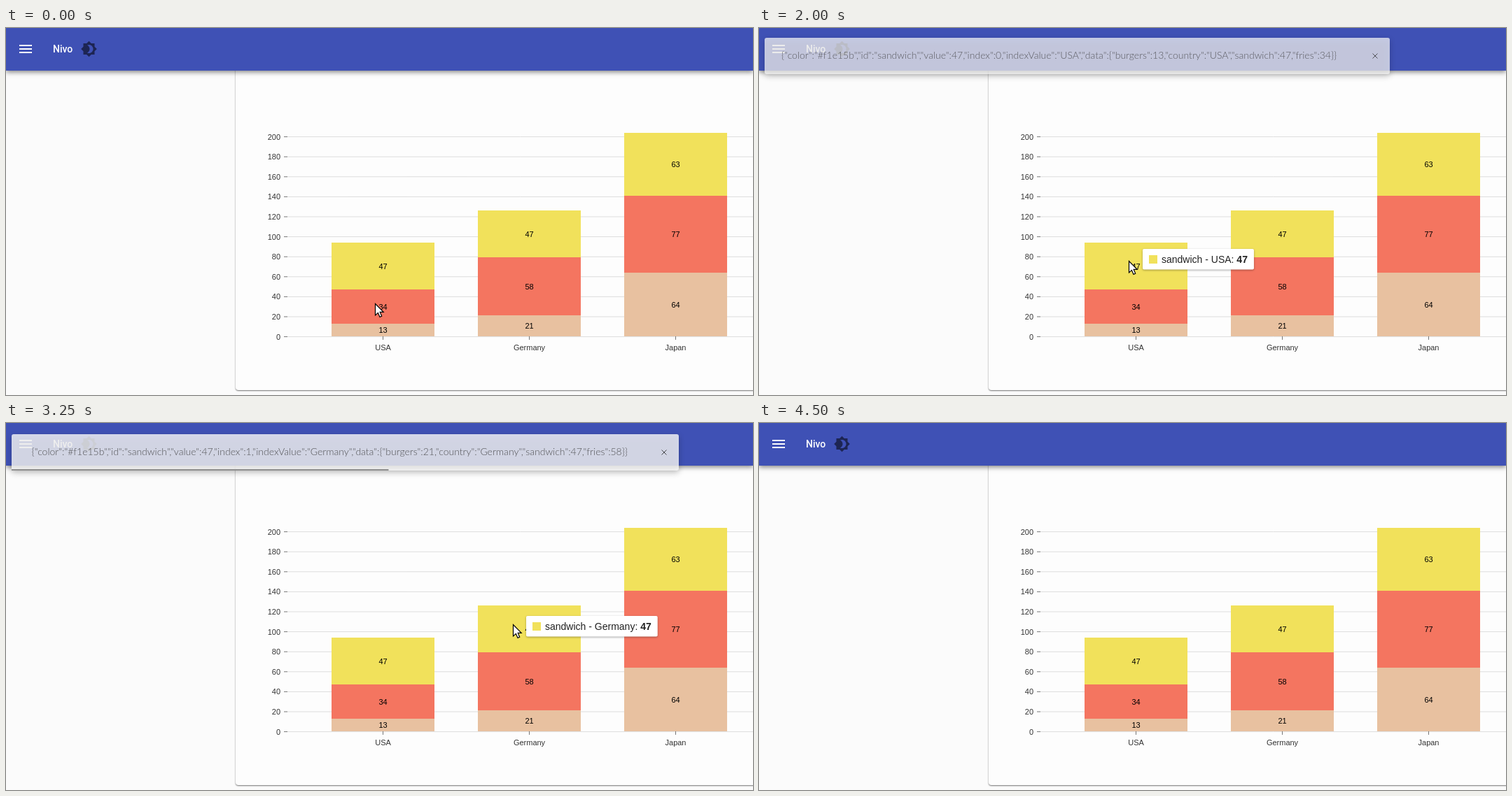
An HTML page with a canvas for the animation above (5000 ms loop, 1067 by 525 pixels).

```html
<!DOCTYPE html>
<html lang="en">
<head>
<meta charset="utf-8">
<title>Stacked bar chart with click toasts</title>
<style>
  html, body { margin: 0; width: 100%; height: 100%; overflow: hidden; background: #fbfbfb; }
  canvas { display: block; }
</style>
</head>
<body>
<canvas id="stage" width="1067" height="525"></canvas>
<script>
const ctx = document.getElementById('stage').getContext('2d');
const LOOP = 5000, STEP = 250;
const SANS = '"Liberation Sans", Arial, sans-serif';
const YELLOW = '#f1e15b', RED = '#f47560', TAN = '#e8c1a0';
const BASE = 441.3, UNIT = 1.43, BAR = 147;

const countries = [
  { name: 'USA', x: 465, burgers: 13, fries: 34, sandwich: 47 },
  { name: 'Germany', x: 674, burgers: 21, fries: 58, sandwich: 47 },
  { name: 'Japan', x: 883, burgers: 64, fries: 77, sandwich: 63 }
];

// Pointer position from a time on; tip = [country index, left, top].
const pointer = [
  { at: 0, x: 527, y: 394 },
  { at: 250, x: 532, y: 335, tip: [0, 552, 318] },
  { at: 500, x: 528, y: 333, tip: [0, 548, 316] },
  { at: 2250, x: 590, y: 331, tip: [0, 600, 314] },
  { at: 2500, x: 672, y: 298 },
  { at: 2750, x: 724, y: 288, tip: [1, 743, 276] },
  { at: 3750, x: 728, y: 290, tip: [1, 745, 277] },
  { at: 4000, x: 739, y: 310, tip: [1, 750, 282] },
  { at: 4250 }
];

// Each pose: top, opacity, remaining progress, text offset.
const toasts = [
  { at: 1000, right: 901, country: 0, poses: [
    [49, .2, .965, 14], [20, .72, .62, 6], [14, .9, .22, 0],
    [14, .9, 0, 0], [14, .72, 0, 0], [14, .35, 0, 0]] },
  { at: 3000, right: 961, country: 1, poses: [
    [33, .45, .9, 10], [16, .8, .565, 4.5], [14, .9, 0, 0],
    [14, .9, 0, 0], [14, .42, 0, 0], [14, .12, 0, 0]] }
];

const menuIcon = new Path2D('M3 6h18v2H3zM3 11h18v2H3zM3 16h18v2H3z');
const themeIcon = new Path2D('M20 8.69V4h-4.69L12 .69 8.69 4H4v4.69L.69 12 4 15.31V20h4.69L12 23.31 15.31 20H20v-4.69L23.31 12zM12 18c-.89 0-1.74-.2-2.5-.55C11.56 16.5 13 14.42 13 12s-1.44-4.5-3.5-5.45C10.26 6.2 11.11 6 12 6c3.31 0 6 2.69 6 6s-2.69 6-6 6z');
const arrow = new Path2D('M.5 .5V17L4.4 13.4L7 19.4L9.7 18.2L7.2 12.4H12.2Z');

function rect(x, y, w, h, color) {
  ctx.fillStyle = color;
  ctx.fillRect(x, y, w, h);
}

function text(str, x, y, font, color, align = 'left') {
  ctx.font = font;
  ctx.fillStyle = color;
  ctx.textAlign = align;
  ctx.fillText(str, x, y);
}

function line(x1, y1, x2, y2, color) {
  ctx.strokeStyle = color;
  ctx.lineWidth = 1;
  ctx.beginPath();
  ctx.moveTo(x1, y1);
  ctx.lineTo(x2, y2);
  ctx.stroke();
}

function shape(path, x, y, fill, stroke) {
  ctx.save();
  ctx.translate(x, y);
  ctx.fillStyle = fill;
  ctx.fill(path, 'evenodd');
  if (stroke) {
    ctx.lineWidth = 1.2;
    ctx.strokeStyle = stroke;
    ctx.stroke(path);
  }
  ctx.restore();
}

function panel(x, y, w, h, radius, fill, shadow, blur, drop) {
  ctx.save();
  ctx.shadowColor = shadow;
  ctx.shadowBlur = blur;
  ctx.shadowOffsetY = drop;
  ctx.fillStyle = fill;
  ctx.beginPath();
  ctx.roundRect(x, y, w, h, radius);
  ctx.fill();
  ctx.restore();
}

function drawChart() {
  const small = '11px ' + SANS;
  for (let v = 0; v <= 200; v += 20) {
    const y = BASE - v * UNIT + .3;
    line(402, y, 1067, y, '#ddd');
    line(397, y, 402, y, '#777');
    text(v, 392, Math.round(y + 4), small, '#333', 'right');
  }
  for (const c of countries) {
    const mid = c.x + BAR / 2;
    let sum = 0;
    for (const [key, color] of [['burgers', TAN], ['fries', RED], ['sandwich', YELLOW]]) {
      const bottom = Math.round(BASE - sum * UNIT);
      sum += c[key];
      const top = Math.round(BASE - sum * UNIT);
      rect(c.x, top, BAR, bottom - top, color);
      text(c[key], mid, Math.round((top + bottom) / 2 + 4), small, '#000', 'center');
    }
    line(mid, 441, mid, 446, '#777');
    text(c.name, mid, 461, small, '#333', 'center');
  }
}

function drawPage() {
  rect(0, 0, 1067, 525, '#fbfbfb');
  panel(328, 40, 800, 478, 4, '#fdfdfd', 'rgba(0,0,0,.55)', 2, 1);
  drawChart();
  panel(0, 0, 1067, 61, 0, '#3f51b5', 'rgba(0,0,0,.5)', 7, 2);
  shape(menuIcon, 16, 18, '#fff');
  text('Nivo', 67, 35, '500 14px Roboto, sans-serif', '#fff');
  shape(themeIcon, 106.5, 18, '#1d2553');
}

function drawTip([index, x, y]) {
  const label = `sandwich - ${countries[index].name}: `;
  const value = countries[index].sandwich;
  const regular = '14px ' + SANS, bold = 'bold ' + regular;
  ctx.font = regular;
  const labelWidth = ctx.measureText(label).width;
  ctx.font = bold;
  const width = 27 + labelWidth + ctx.measureText(value).width + 9;
  panel(x, y, width, 29.5, 2, '#fff', 'rgba(0,0,0,.35)', 3, 1);
  rect(x + 9, y + 9, 12, 12, YELLOW);
  text(label, x + 27, y + 20, regular, '#222');
  text(value, x + 27 + labelWidth, y + 20, bold, '#222');
}

function drawToast({ right, country, poses }, step) {
  const [top, alpha, progress, shift] = poses[step];
  const { name, burgers, sandwich, fries } = countries[country];
  const message = JSON.stringify({
    color: YELLOW, id: 'sandwich', value: sandwich, index: country, indexValue: name,
    data: { burgers, country: name, sandwich, fries }
  });
  const width = right - 8, cx = right - 21, cy = top + 26;
  ctx.save();
  ctx.globalAlpha = alpha;
  panel(8, top, width, 52, 3, '#fafafa', 'rgba(0,0,0,.3)', 9, 3);
  text(message, 32 + shift, top + 30, '300 14px Lato, sans-serif', '#333');
  line(cx - 3.5, cy - 3.5, cx + 3.5, cy + 3.5, '#222');
  line(cx + 3.5, cy - 3.5, cx - 3.5, cy + 3.5, '#222');
  rect(8, top + 50, width * progress, 2, '#777');
  ctx.restore();
}

function draw(time) {
  drawPage();
  const { x, y, tip } = pointer.findLast(p => p.at <= time);
  if (tip) drawTip(tip);
  for (const toast of toasts) {
    const step = Math.floor((time - toast.at) / STEP);
    if (toast.poses[step]) drawToast(toast, step);
  }
  if (x !== undefined) shape(arrow, x, y, '#fff', '#000');
}

const start = performance.now();
function frame() {
  draw((performance.now() - start) % LOOP);
  requestAnimationFrame(frame);
}
frame();
</script>
</body>
</html>
```
